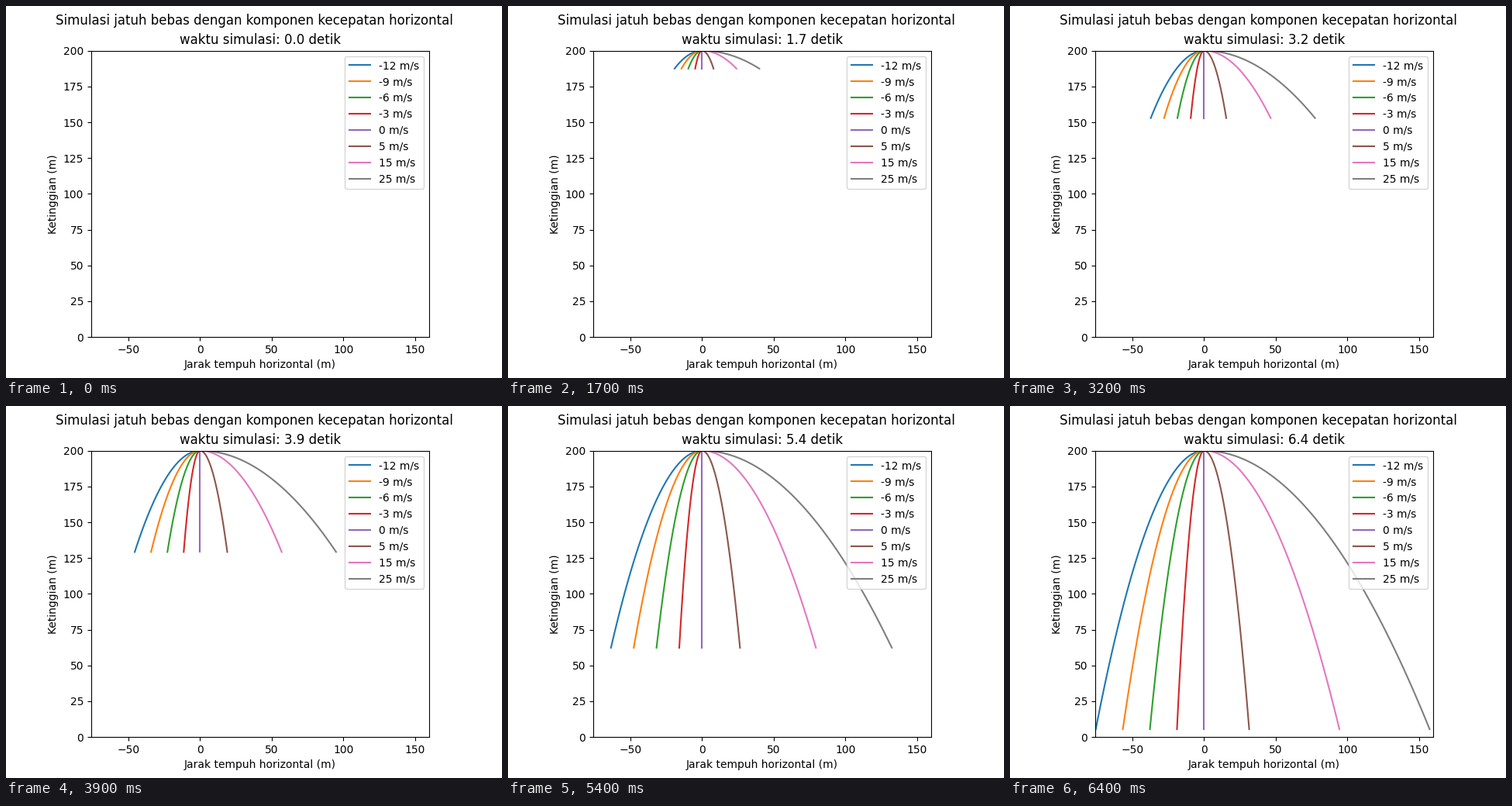
A matplotlib script for the animation above (6500 ms loop, 640x480 px).

```python
import numpy as np
import matplotlib.pyplot as plt
from matplotlib.animation import FuncAnimation

G = 9.8
HEIGHT = 200
STEP = 0.1
FRAMES = 65
SPEEDS = [-12, -9, -6, -3, 0, 5, 15, 25]

t = np.arange(FRAMES) * STEP
y = HEIGHT - G * t**2 / 2

fig, ax = plt.subplots(figsize=(6.4, 4.8), dpi=100)
fig.suptitle("Simulasi jatuh bebas dengan komponen kecepatan horizontal")
ax.set_aspect("equal")
ax.set_xlim(-76, 160)
ax.set_ylim(0, HEIGHT)
ax.set_xlabel("Jarak tempuh horizontal (m)")
ax.set_ylabel("Ketinggian (m)")
title = ax.set_title("")

lines = [ax.plot([], [], label=f"{v} m/s")[0] for v in SPEEDS]
ax.legend(loc="upper right")


def update(i):
    # The trail holds the samples taken before the displayed time.
    for v, line in zip(SPEEDS, lines):
        line.set_data(v * t[:i], y[:i])
    title.set_text(f"waktu simulasi: {i * STEP:.1f} detik")
    return lines + [title]


anim = FuncAnimation(fig, update, frames=FRAMES, interval=100,
                     repeat=True, repeat_delay=0, blit=False)
plt.show()
```
